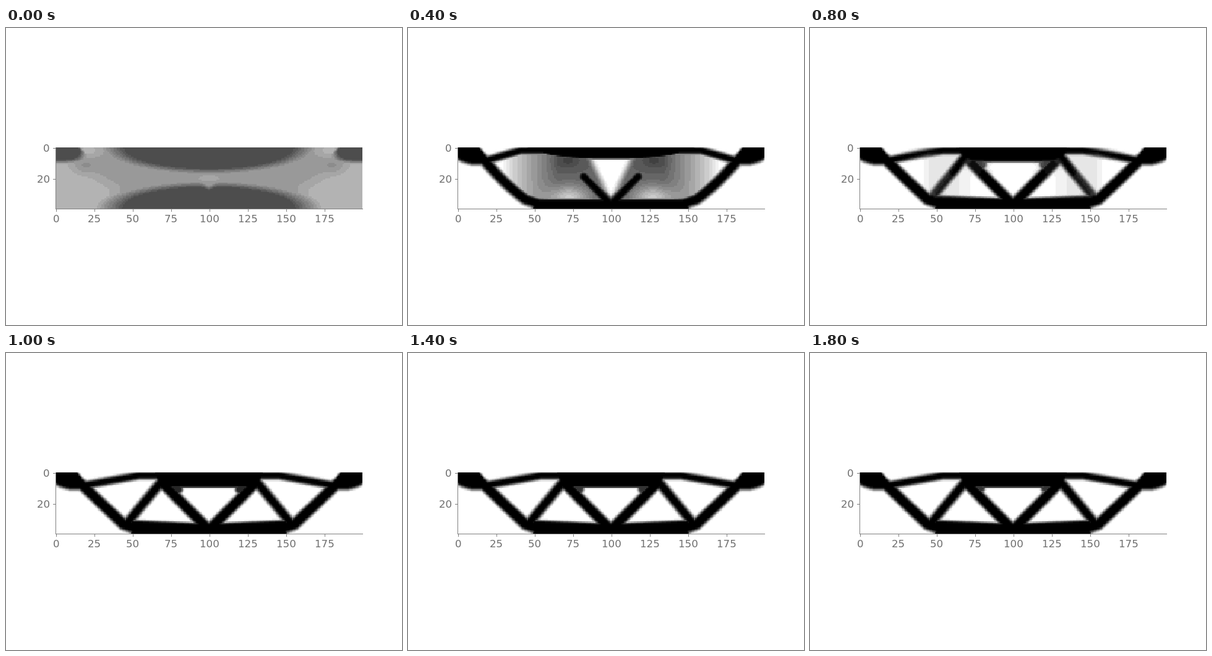
An HTML page with a canvas for the animation above (2 s loop, 640 by 480 pixels).

```html
<!DOCTYPE html>
<html lang="en">
<head>
<meta charset="utf-8">
<title>Beam density evolution</title>
<style>
  html, body { margin: 0; width: 100%; height: 100%; overflow: hidden; background: #fff; }
  canvas { display: block; width: 640px; height: 480px; }
</style>
</head>
<body>
<canvas id="stage" width="640" height="480"></canvas>
<script>
const COLS = 200, ROWS = 40, CELL = 2.48;
const LEFT = 80, TOP = 192.8, BOTTOM = 292, MIDDLE = 328;
const STEP_MS = 200, STEPS = 10;

const clamp = (v, lo = 0, hi = 1) => Math.min(hi, Math.max(lo, v));
const mix = (a, b, t) => a + (b - a) * t;
const ramp = (d, soft) => {
  const t = clamp(d / soft + 0.5);
  return t * t * (3 - 2 * t);
};
const blob = (x, y, cx, cy, rx, ry) => Math.exp(-(((x - cx) / rx) ** 2) - ((y - cy) / ry) ** 2);

function distanceTo(points, x, y) {
  let best = Infinity;
  for (let i = 1; i < points.length; i++) {
    const [ax, ay] = points[i - 1];
    const dx = points[i][0] - ax, dy = points[i][1] - ay;
    const t = clamp(((x - ax) * dx + (y - ay) * dy) / (dx * dx + dy * dy));
    best = Math.min(best, Math.hypot(x - ax - t * dx, y - ay - t * dy));
  }
  return best;
}

const bar = (points, radius, soft = 8, weight = 1) => (x, y) =>
  weight * ramp(radius - distanceTo(points, x, y), soft);

// The outer strut's centre line falls at about 45 degrees and may sag.
const strutHeight = (x, sag) => {
  const t = clamp((x - 122) / 68);
  return 212 + 65 * t + 4 * sag * t * (1 - t);
};
function strut(sag, radius, soft, weight) {
  const points = [];
  for (let x = 122; x <= 190; x += 8.5) points.push([x, strutHeight(x, sag)]);
  points.push([212, 284], [240, 285]);
  return bar(points, radius, soft, weight);
}

const armHeight = (x, knee) => mix(213.5, 198, clamp((x - 128) / (knee - 128)));
const arm = (knee, radius, soft, weight) =>
  bar([[128, 213.5], [knee, 198], [250, 198]], radius, soft, weight);

function pad(x, y, soft) {
  const floor = 210 + 11 * Math.sqrt(clamp((x - LEFT) / 24));
  return Math.min(ramp(116 + 0.8 * (y - TOP) - x, soft * 0.7), ramp(floor - y, soft));
}

// Light wedge narrowing downwards from the top chord.
const wedge = (x, y, halfWidth, soft) =>
  ramp(halfWidth - 0.47 * (y - 208) - (MIDDLE - x), soft);

function initial(x, y) {
  const u = MIDDLE - x;
  const notch = 5 * Math.exp(-((u / 9) ** 2));
  const lobe = g => 0.7 - 1.2 * (g - 1);
  const upper = lobe(Math.hypot(u / 135, (y - TOP) / 34));
  const lower = lobe(Math.hypot(u / 138, (BOTTOM - y) / (35 - notch)));
  const round = lobe((((x - LEFT) / 39) ** 4 + ((y - TOP) / 20) ** 4) ** 0.25);
  const corner = Math.min(round, 0.3 + 0.4 * ramp(119 + 0.7 * (y - TOP) - x, 8));
  const inward = Math.max(0.64 * (x - LEFT) - (y - 217), x - 155);
  const base = 0.3 + 0.1 * ramp(inward - 20, 46)
    - 0.1 * blob(x, y, 133, 198, 22, 11)
    + 0.07 * blob(x, y, 124, 224, 18, 12)
    - 0.04 * blob(x, y, MIDDLE, 243, 24, 8);
  return clamp(Math.max(base, upper, lower, corner), 0.3, 0.7);
}

// Chords, strut and arm shared by every later state; braces and haze vary.
function beam({ soft, depth, half, power, floor, slope, sag, knee, member, braces, haze }) {
  const parts = [strut(sag, ...member), arm(knee, 6, soft), ...braces];
  return (x, y) => {
    const upper = TOP + depth * (1 - Math.abs((MIDDLE - x) / half) ** power);
    const lower = Math.min(y - floor - slope * (x - 215), x - 201);
    const inside = x > 128 && y < strutHeight(x, sag) && y > armHeight(x, knee);
    return Math.max(
      inside ? clamp(haze(x, y)) : 0,
      pad(x, y, soft + 2),
      ramp(upper - y, soft * 0.6),
      ramp(lower, soft * 0.8),
      ...parts.map(part => part(x, y)));
  };
}

const early = beam({
  soft: 9, depth: 14, half: 150, power: 2, floor: 280, slope: -0.04, sag: 6, knee: 180,
  member: [8, 13, 0.95],
  braces: [bar([[284, 248], [318, 278]], 7, 20, 0.78)],
  haze(x, y) {
    const web = 0.3 + 0.25 * ramp(x - 210, 120) - 0.12 * blob(x, y, 250, 270, 34, 14);
    return mix(web, 0.06 + 0.005 * (y - 207), wedge(x, y, 42, 26));
  }
});

const forming = beam({
  soft: 8, depth: 19, half: 142, power: 3, floor: 276, slope: 0, sag: 4, knee: 182,
  member: [8.5, 9],
  braces: [bar([[284, 240], [325, 282]], 8, 11)],
  haze(x, y) {
    const web = 0.62 * clamp((x - 152) / 90) ** 0.8
      - 0.42 * blob(x, y, 260, 275, 32, 20)
      + 0.12 * blob(x, y, 258, 214, 22, 14);
    return mix(web, 0, wedge(x, y, 34, 18));
  }
});

const truss = beam({
  soft: 8, depth: 22, half: 94, power: 8, floor: 273, slope: 0.02, sag: 1.5, knee: 190,
  member: [8.8, 8],
  braces: [
    bar([[280, 236], [325, 282]], 8.5, 9),
    bar([[264, 220], [283, 238]], 9, 15, 0.85),
    bar([[249, 208], [232, 234]], 8, 13, 0.95),
    bar([[232, 234], [207, 268]], 8, 20, 0.7)
  ],
  haze: (x, y) => 0.29 * ramp(x - 186, 18) * ramp(252 - x, 44)
    + 0.65 * blob(x, y, 268, 218, 18, 11)
});

// k in 0..1 fades the last grey corner patch.
const settled = k => beam({
  soft: 8, depth: 24.5, half: 88, power: 12, floor: 270.5, slope: 0.045, sag: 0, knee: 215,
  member: [8.8, 8],
  braces: [
    bar([[250, 209], [199, 271]], 7.6, 9),
    bar([[254, 211], [324, 282]], 8.6),
    bar([[262, 219], [278 - 2 * k, 220 - k]], 8 - k, 7, 0.83 - 0.04 * k)
  ],
  haze: () => 0
});

const settling = (x, y) => mix(truss(x, y), settled(0)(x, y), 0.7);
const fields = [initial, early, forming, truss, settling];
for (let i = fields.length; i < STEPS; i++) fields.push(settled((i - 5) / 4));

// Paints one mirrored density field, one pixel per cell.
function render(field) {
  const image = document.createElement("canvas");
  image.width = COLS;
  image.height = ROWS;
  const g = image.getContext("2d");
  for (let row = 0; row < ROWS; row++) {
    for (let col = 0; col < COLS / 2; col++) {
      const d = field(LEFT + (col + 0.5) * CELL, TOP + (row + 0.5) * CELL);
      const tone = Math.round(255 * (1 - Math.round(d * 20) / 20));
      g.fillStyle = `rgb(${tone},${tone},${tone})`;
      g.fillRect(col, row, 1, 1);
      g.fillRect(COLS - 1 - col, row, 1, 1);
    }
  }
  return image;
}

const images = fields.map(render);
const ctx = document.getElementById("stage").getContext("2d");

// Aligns the inked width of a label on whole pixels.
function label(text, x, y, align) {
  const { actualBoundingBoxLeft: before, actualBoundingBoxRight: after } = ctx.measureText(text);
  ctx.fillStyle = "#707070";
  ctx.fillText(text, Math.round(x - align * (before + after) + before), Math.round(y));
}

function drawAxes() {
  const center = (origin, n) => origin + (n + 0.5) * CELL;
  const line = (x, y, w, h) => {
    ctx.fillStyle = "#808080";
    ctx.fillRect(x, y, w, h);
  };
  ctx.font = '16.67px "DejaVu Sans", sans-serif';
  line(80, 193, 1, 100);
  line(80, 292, 497, 1);
  for (let n = 0; n < COLS; n += 25) {
    const x = center(LEFT, n);
    line(Math.floor(x), 293, 1, 4);
    label(n, x, 314, 0.5);
  }
  for (let n = 0; n < ROWS; n += 20) {
    const y = center(TOP, n);
    line(76, Math.round(y), 4, 1);
    label(n, 70.3, y + 6, 1);
  }
}

function draw(now) {
  const step = Math.floor(now / STEP_MS) % STEPS;
  ctx.fillStyle = "#fff";
  ctx.fillRect(0, 0, 640, 480);
  ctx.imageSmoothingEnabled = false;
  ctx.drawImage(images[step], 80, 193, 496, 99);
  drawAxes();
}

const start = performance.now();
function tick() {
  draw(performance.now() - start);
  requestAnimationFrame(tick);
}
tick();
</script>
</body>
</html>
```
